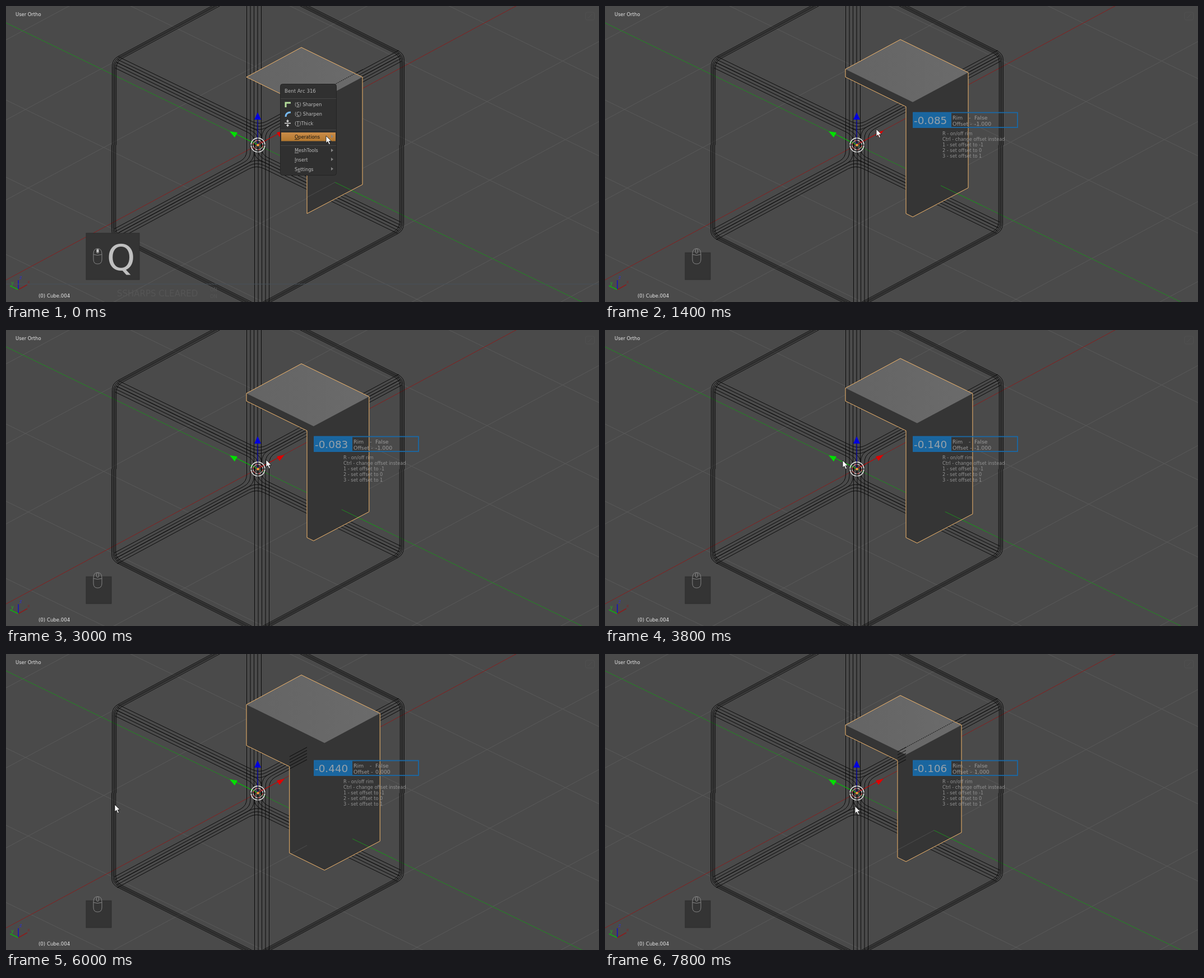
An HTML page that plays this animation: 1058x529 px, repeating every 8000 ms.

```html
<!DOCTYPE html>
<html lang="en">
<head>
<meta charset="utf-8">
<title>Thickness tool</title>
<style>
  html, body { margin: 0; width: 100%; height: 100%; overflow: hidden; background: #4a4a4a; }
  svg { display: block; width: 1058px; height: 529px; font-family: "DejaVu Sans", sans-serif; }
  path { fill: none; }
  text { white-space: pre; }
  .wire { stroke: #0b0b0b; }
  .small { font-size: 8.2px; }
  .hud { font-size: 9.4px; fill: #9b9b9b; }
  .u { text-decoration: underline; text-decoration-thickness: .6px; }
</style>
</head>
<body>
<svg id="stage" viewBox="0 0 1058 529"></svg>
<script>
const STEP = 200, LOOP = 8000;
const G = .4857, GC = 30;       // green axis: slope, intercept
const R = -.538, RC = 489.6;    // red axis
const range = (n, f) => Array.from({ length: n }, (_, i) => f(i));
const seg = (m, c, x0, x1) => `M${x0} ${m * x0 + c}L${x1} ${m * x1 + c}`;
const label = (x, y, s, attrs) => `<text x="${x}" y="${y}" ${attrs}>${s}</text>`;

// Polyline with softened corners
function round(pts, r) {
  const toward = ([x, y], [tx, ty]) => {
    const k = r / Math.hypot(tx - x, ty - y);
    return [x + (tx - x) * k, y + (ty - y) * k];
  };
  let d = 'M' + pts[0];
  for (let i = 1; i < pts.length - 1; i++)
    d += `L${toward(pts[i], pts[i - 1])}Q${pts[i]} ${toward(pts[i], pts[i + 1])}`;
  return d + 'L' + pts.at(-1);
}

// Bevelled edges of the cube that meet at its front corner
const leftC = k => GC - 37 + 5.75 * k;
const rightC = k => RC - 34 + 5.5 * k;
const leftEnd = k => [200 - 1.5 * k, G * (200 - 1.5 * k) + leftC(k)];
const rightEnd = k => [700 + 1.5 * k, R * (700 + 1.5 * k) + rightC(k)];

function cubeHalf() {
  let d = '';
  for (let k = 0; k < 5; k++) {
    if (k <= 2) {
      const x = (rightC(k) - leftC(k)) / (G - R);
      d += round([leftEnd(k), [x, G * x + leftC(k)], rightEnd(k)], 15);
    }
    if (k >= 2) {
      const xl = 443 + 6.5 * (4 - k), xr = 469 - 6.5 * (4 - k);
      d += round([leftEnd(k), [xl, G * xl + leftC(k)], [xl, 560]], 13);
      d += round([rightEnd(k), [xr, R * xr + rightC(k)], [xr, 560]], 13);
    }
  }
  for (const i of [0, 2.5, 4.7, 7.2]) {
    const l = 189 + i, r = 710 - i, tl = 366 + 1.9 * i, tr = 535 - 2 * i;
    d += round([[l, 248], [l, R * (l - tl)], [450, R * (450 - tl)],
                [r, G * (r - tr)], [r, 248]], 12);
  }
  return d;
}

function scene() {
  const grid = range(9, i => i - 4).filter(Boolean).map(i =>
    seg(G, GC + 138 * i, 0, 1058) + seg(R, RC + 143 * i, 0, 1058)).join('');
  return `
    <rect width="1058" height="529" fill="#4a4a4a"/>
    <path d="${grid}" stroke="#595959"/>
    <path d="${seg(R, RC, 0, 1058)}" stroke="#861f1f"/>
    <path d="${seg(G, GC, 0, 1058)}" stroke="#1f8a1f"/>
    <g transform="translate(.5 .5)">
      <path id="half" class="wire" d="${cubeHalf()}"/>
      <use href="#half" transform="rotate(180 449 248)"/>
    </g>
    <g id="slab">
      <path id="body" style="fill:#353535"/>
      <path id="top" style="fill:url(#shade)"/>
      <path id="front" class="wire"/>
      <path id="inner" stroke="#4d4d4d"/>
      <path id="flush" class="wire" stroke-dasharray="2 1.5" d="${seg(R, rightC(0), 527, 636)}"/>
      <path id="axis" stroke="#1f8a1f"/>
      <path id="edge" stroke="#f3b76d"/>
    </g>
    <linearGradient id="shade"><stop stop-color="#646464"/><stop offset="1" stop-color="#6b6b6b"/></linearGradient>`;
}

function gizmo() {
  return `
    <path d="M449 248V204" stroke="#0000d8"/>
    <path d="M449 248L411 229" stroke="#00c800"/>
    <path d="M449 248L486 228" stroke="#d00000"/>
    <path d="M449 190L455 203H443Z" style="fill:#0000e0"/>
    <path d="M399 224L413 226L408 235Z" style="fill:#00e000"/>
    <path d="M497 223L483 226L488 234Z" style="fill:#e00000"/>
    <circle cx="449.5" cy="248.5" r="12.5" fill="none" stroke="#fff" stroke-width="1.3"/>
    <circle cx="449.5" cy="248.5" r="8.5" fill="none" stroke="#fff"/>
    <circle cx="449.5" cy="248.5" r="8.5" fill="none" stroke="#e02020" stroke-dasharray="4.4 4.5"/>
    <path class="wire" d="M436 248.5H445M454 248.5H463M449.5 235V244M449.5 253V262"/>
    <circle cx="449.5" cy="248.5" r="2.3" fill="#f29a3c"/>`;
}

function corners() {
  const t = 'class="small" fill=';
  return `
    ${label(17, 18, 'User Ortho', 'font-size="8.4" fill="#e8e8e8"')}
    ${label(58, 521, '(0) Cube.004', 'font-size="8.6" fill="#e8e8e8"')}
    <path d="M22 507V490" stroke="#1010c8" stroke-width="1.5"/>
    <path d="M22 507L7 500" stroke="#10b010" stroke-width="1.5"/>
    <path d="M22 507L38 498" stroke="#8c1c1c" stroke-width="1.5"/>
    ${label(24, 488, 'z', t + '"#3030d0"')}
    ${label(9, 498, 'y', t + '"#20b020"')}
    ${label(38, 496, 'x', t + '"#7c2a2a"')}
    <rect x="1034" y="11" width="16" height="14" rx="3" fill="none" stroke="#505050"/>
    <path d="M1038 22L1046 14" stroke="#505050"/>
    <g id="ghost" fill="#555">
      ${label(198, 519, 'SSHARPS CLEARED', 'font-size="15"')}
      ${label(364, 510, 'ON', 'class="small"')}
      ${label(364, 522, 'ON', 'class="small"')}
      <path d="M0 497H1058" stroke="#47505a"/>
    </g>`;
}

function keys() {
  return `
    <rect id="keyBox" x="143" width="45" fill="#343434" stroke="#2d2d2d"/>
    <g stroke="#858585">
      <path d="M156 443Q156 433.5 163.5 433.5T171 443V453Q171 461 163.5 461T156 453Z"/>
      <path d="M156 444Q163 447 171 444"/>
      <rect x="161.5" y="434" width="4" height="8" rx="2" fill="#444"/>
    </g>
    <g id="key">
      <rect x="162" y="434.5" width="3" height="6" rx="1.5" fill="#c8c8c8"/>
      ${label(180, 472, 'Q', 'font-size="64" fill="#c0c0c0"')}
    </g>`;
}

function menu() {
  const items = [
    [179, '(<tspan class="u">S</tspan>) Sharpen'],
    [196, '(<tspan class="u">C</tspan>) Sharpen'],
    [213, '(<tspan class="u">T</tspan>)Thick'],
    [237, '<tspan class="u">O</tspan>perations'],
    [261, '<tspan class="u">M</tspan>eshTools'],
    [278, '<tspan class="u">I</tspan>nsert'],
    [295, 'S<tspan class="u">e</tspan>ttings']];
  return `<g id="menu">
    <rect x="489.500" y="139.500" width="100" height="163" rx="4" fill="#303030" stroke="#242424"/>
    <path d="M490 165.500H589M490 221.500H589M490 249.500H589" stroke="#454545"/>
    ${label(497, 155, 'Bent Arc 316', 'font-size="8.6" fill="#b8b8b8"')}
    <linearGradient id="warm" x2="0" y2="1"><stop stop-color="#cb8d49"/><stop offset="1" stop-color="#b2772f"/></linearGradient>
    <rect id="hot" x="491" width="97" height="15.500" fill="url(#warm)"/>
    ${items.map(([y, s]) => label(515, y, s, 'class="small item" fill="#bdbdbd"')).join('')}
    ${[233, 258, 274, 291].map(y => `<path d="M580 ${y - 3}L584 ${y}L580 ${y + 3}Z" style="fill:#858585"/>`).join('')}
    <path d="M499 181V173H508" stroke="#b4dc9a" stroke-width="3"/>
    <path d="M499 198Q499 190 508 190" stroke="#76b8ee" stroke-width="3"/>
    <path d="M497 209.500H508M502.500 203V207M502.500 212V216M500.500 205L502.500 207L504.500 205M500.500 214L502.500 212L504.500 214" stroke="#e4e4e4" stroke-width="1.300"/>
  </g>`;
}

function hud() {
  const help = ['R - on/off rim', 'Ctrl - change offset instead',
    '1 - set offset to -1', '2 - set offset to 0', '3 - set offset to 1'];
  return `<g id="hud">
    <rect x="550" y="190" width="68" height="27" fill="#1a669f"/>
    <rect x="550" y="190.500" width="186" height="26.500" fill="none" stroke="#1a69a6" stroke-width="1.800"/>
    <text id="amount" x="551" y="211" font-size="18.400" fill="#98a2aa"></text>
    ${label(620, 203, 'Rim', 'class="hud"')}${label(649, 203, '-', 'class="hud"')}
    ${label(659, 203, 'False', 'class="hud"')}
    ${label(620, 214, 'Offset -', 'class="hud"')}
    <text id="offset" x="659" y="214" class="hud"></text>
    ${help.map((s, i) => label(602, 230.5 + 10 * i, s, 'class="small" fill="#929292"')).join('')}
  </g>`;
}

const stage = document.getElementById('stage');
stage.innerHTML = scene() + gizmo() + corners() + keys() + menu() + hud() +
  `<path id="cursor" d="M0 0V13L3 10.300L5.300 15.500L7.600 14.500L5.300 9.500H9.300Z"
    style="fill:#fff" stroke="#111" stroke-width=".8"/>`;
const el = {};
for (const n of stage.querySelectorAll('[id]')) el[n.id] = n;
const items = stage.querySelectorAll('.item');
const show = (n, on) => n.setAttribute('visibility', on ? 'visible' : 'hidden');
const setPath = (n, d) => n.setAttribute('d', d);

// step, thickness, pointer x, pointer y
const moves = [
  [0, 0, 571, 232], [1, 0, 549, 210], [3, 0, 530, 208], [6, .06, 501, 214],
  [7, .085, 484, 220], [10, .205, 388, 232], [11, .17, 415, 233], [12, .19, 399, 233],
  [13, .245, 351, 232], [15, .083, 464, 232], [16, .075, 470, 232], [19, .14, 424, 233],
  [24, .304, 308, 234], [27, .4, 230, 252], [30, .44, 194, 269], [32, .42, 204, 271],
  [33, .42, 204, 271], [34, .225, 359, 273], [36, .15, 414, 273], [39, .106, 446, 272]];

function stateAt(step) {
  const i = Math.max(1, moves.findIndex(m => m[0] >= step));
  const p = moves[i - 1], q = moves[i], f = (step - p[0]) / (q[0] - p[0]);
  return p.map((v, j) => v + (q[j] - v) * f);
}

function drawSlab(out, inn, faced) {
  const up = 166 * out, ox = 142 * out, oy = 70 * out;
  const down = 166 * inn, ix = 142 * inn, iy = 70 * inn;
  const back = [[429, 127 - up], [527, 74 - up], [636 + ox, 127 - up + oy]];
  const rim = [...back, [636 + ox, 319 + oy], [537 + ox, 371 + oy],
    [537 - ix, 371 - iy], [537 - ix, 180 + down - iy], [429, 127 + down]];
  const shape = 'M' + rim.join('L') + 'Z';
  setPath(el.body, shape);
  setPath(el.edge, shape);
  setPath(el.top, 'M' + [...back, [537 + ox, 180 - up + oy]].join('L') + 'Z');
  setPath(el.front, inn ? range(5, k => seg(R, rightC(k), 537 - ix, 537)).join('') : '');
  setPath(el.inner, seg(R, RC + 141.3, 537 - ix, faced ? 587 : 537));
  setPath(el.axis, seg(G, GC, 587 + ox, 660 + ox));
  show(el.flush, faced);
}

let last = -1;
function render(step) {
  const [, th, x, y] = stateAt(step);
  const off = step < 20 ? -1 : step < 37 ? 0 : 1;
  const out = th * (1 - off) / 2;
  drawSlab(out, th * (1 + off) / 2, out === 0);

  const open = step < 3, held = step < 4, pick = step ? 2 : 3;
  show(el.menu, open);
  show(el.hud, !open);
  show(el.key, held);
  show(el.ghost, step < 2);
  el.keyBox.setAttribute('y', held ? 406 : 441);
  el.keyBox.setAttribute('height', held ? 83 : 48);
  el.keyBox.setAttribute('width', held ? 95 : 45);
  el.hot.setAttribute('y', pick === 3 ? 226 : 202);
  items.forEach((n, i) => n.setAttribute('fill', i === pick ? '#111' : '#bdbdbd'));
  el.amount.textContent = '-' + th.toFixed(3);
  el.offset.textContent = off.toFixed(3);
  el.cursor.setAttribute('transform', `translate(${Math.round(x)} ${Math.round(y)})`);
}

function tick() {
  const step = Math.floor(performance.now() % LOOP / STEP);
  if (step !== last) render(last = step);
  requestAnimationFrame(tick);
}
tick();
</script>
</body>
</html>
```
